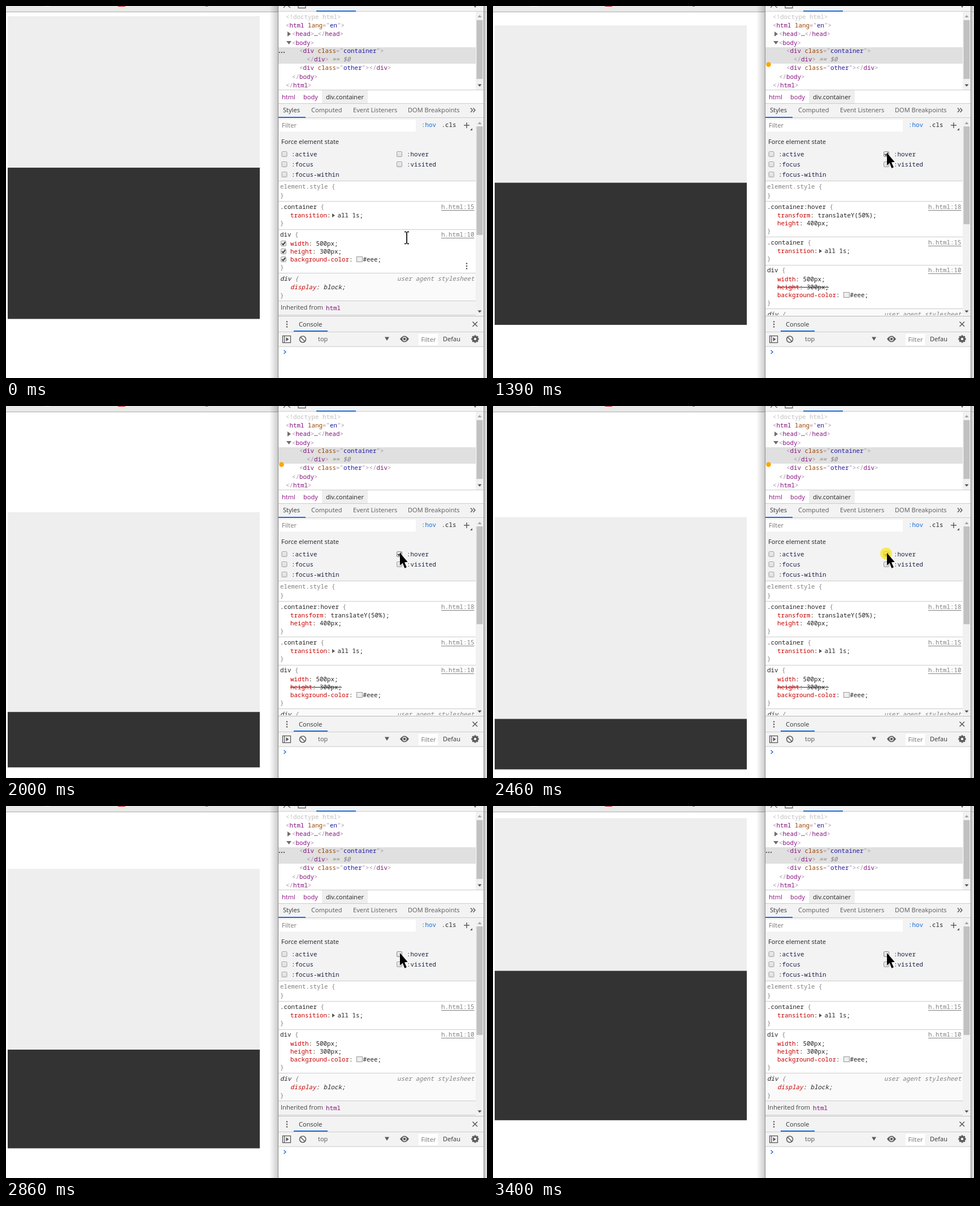
These frames come from a looping animation (851x658 px, 3480 ms). An HTML page with a canvas:

```html
<!DOCTYPE html>
<html lang="en">
<head>
<meta charset="utf-8">
<title>Forced hover state</title>
<style>
html, body { margin: 0; width: 100%; height: 100%; overflow: hidden; background: #fff; }
canvas { display: block; }
</style>
</head>
<body>
<canvas id="stage" width="851" height="658"></canvas>
<script>
const ctx = document.getElementById('stage').getContext('2d');
const LOOP = 3480;
const MONO = '10.83px "Noto Sans Mono", monospace';
const SANS = '11.1px "Open Sans", sans-serif';
const INK = '#222', RED = '#c80000', GREY = '#808080', PALE = '#a894a6';
const TAG = '#881280', ATTR = '#994500', VALUE = '#1a1aa6', BLUE = '#1a6edb', BAR = '#f3f3f3';

// The screen only refreshes at these moments.
const ticks = [0, 70, 140, 220, 290, 370, 440, 520, 590, 660, 750, 820, 900, 980,
  1140, 1220, 1300, 1390, 1460, 1540, 1620, 1670, 1770, 1850, 1930, 2000, 2080, 2150, 2220,
  2460, 2630, 2700, 2780, 2860, 2930, 3000, 3080, 3150, 3250, 3320, 3400];

const clamp = v => Math.max(0, Math.min(1, v));
const mix = (a, b, k) => a + (b - a) * k;
const smooth = k => k * k * (3 - 2 * k);

// CSS "ease": cubic-bezier(.25, .1, .25, 1)
function ease(x) {
  x = clamp(x);
  if (x === 0 || x === 1) return x;
  let lo = 0, hi = 1, u;
  for (let i = 0; i < 24; i++) {
    u = (lo + hi) / 2;
    const bx = .75 * u * (1 - u) + u ** 3;
    if (bx < x) lo = u; else hi = u;
  }
  return .3 * u * (1 - u) ** 2 + 3 * u * u * (1 - u) + u ** 3;
}

function hoverAmount(t) {
  if (t < 1300) return 0;
  if (t < 2630) return ease((t - (t < 1650 ? 1276 : 1250)) / 1000);
  return 1 - ease((t - 2606) / 1000);
}

function pointer(t) {
  if (t < 590) {
    const k = smooth(t / 590);
    return [mix(709, 703, k), mix(410, 277, k)];
  }
  if (t < 660) return [703, 277];
  const k = smooth(clamp((t - 660) / 320));
  return [mix(702, 697, k), mix(275, 260, k)];
}

function rect(x, y, w, h, color) {
  ctx.fillStyle = color;
  ctx.fillRect(x, y, w, h);
}

function poly(color, ...p) {
  ctx.fillStyle = color;
  ctx.beginPath();
  for (let i = 0; i < p.length; i += 2) ctx.lineTo(p[i], p[i + 1]);
  ctx.fill();
}

function stroke(color, width, ...p) {
  ctx.strokeStyle = color;
  ctx.lineWidth = width;
  ctx.beginPath();
  for (let i = 0; i < p.length; i += 2) ctx.lineTo(p[i], p[i + 1]);
  ctx.stroke();
}

function disc(x, y, r, color) {
  ctx.fillStyle = color;
  ctx.beginPath();
  ctx.arc(x, y, r, 0, 7);
  ctx.fill();
}

function ring(x, y, r, color, width) {
  ctx.strokeStyle = color;
  ctx.lineWidth = width;
  ctx.beginPath();
  ctx.arc(x, y, r, 0, 7);
  ctx.stroke();
}

function dots(x, y, dx, dy, r, color) {
  for (let i = -1; i < 2; i++) disc(x + i * dx, y + i * dy, r, color);
}

function label(s, x, y, color = '#333') {
  ctx.font = SANS;
  ctx.fillStyle = color;
  ctx.fillText(s, x, y);
}

// Colour and text alternate; y is the baseline.
function write(font, x, y, runs) {
  ctx.font = font;
  for (let i = 0; i < runs.length; i += 2) {
    ctx.fillStyle = runs[i];
    ctx.fillText(runs[i + 1], x, y);
    x += ctx.measureText(runs[i + 1]).width;
  }
}
const code = (x, y, ...runs) => write(MONO, x, y, runs);
const slanted = (x, y, ...runs) => write('italic ' + MONO, x, y, runs);

function checkbox(x, y, checked, over) {
  const g = ctx.createLinearGradient(0, y, 0, y + 10);
  g.addColorStop(0, '#ededed');
  g.addColorStop(1, '#dcdcdc');
  ctx.fillStyle = g;
  ctx.strokeStyle = over ? '#888' : '#a0a0a0';
  ctx.lineWidth = 1;
  ctx.beginPath();
  ctx.roundRect(x + .5, y + .5, 9, 9, 1.5);
  ctx.fill();
  ctx.stroke();
  if (checked) stroke('#333', 1.8, x + 2.2, y + 5, x + 4.3, y + 7.3, x + 8, y + 2.4);
}

function scrollbar(top, bottom, thumbTop, thumbBottom) {
  rect(831, top, 14, bottom - top, '#f1f1f1');
  rect(832.5, thumbTop, 11, thumbBottom - thumbTop, '#c1c1c1');
}

function drawPage(p) {
  const z = .8925, h = (300 + 100 * p) * z;
  rect(0, 0, 851, 658, '#fff');
  rect(0, 0, 481, 10, '#e9e9e9');
  rect(0, 10, 481, 1, '#adadad');
  rect(66, 0, 13, 1, '#fff');
  rect(198, 0, 13, 1, '#d4141c');
  rect(353, 0, 4, 1, '#777');
  rect(3, 18 + h, 446, 300 * z, '#333');
  rect(3, 18 + h * p / 2, 446, h, '#eee');
  const g = ctx.createLinearGradient(466, 0, 481, 0);
  g.addColorStop(0, 'rgba(0,0,0,0)');
  g.addColorStop(1, 'rgba(0,0,0,.2)');
  rect(466, 0, 15, 658, g);
}

function drawTree(hover) {
  rect(482, 0, 364, 658, '#fff');
  rect(482, 0, 364, 10, BAR);
  rect(482, 9, 364, 1, '#ccc');
  rect(549, 8, 70, 2, BLUE);
  stroke('#666', 1.3, 491, 3, 494, 0);
  stroke('#666', 1.3, 499, 0, 503, 3);
  stroke('#666', 1.3, 517, 0, 517, 3.5, 530, 3.5, 530, 0);
  disc(830, 1, 1.5, '#666');

  rect(482, 73, 349, 29, '#e0e0e0');
  code(495, 23, '#c0c0c0', '<!doctype html>');
  code(495, 38, PALE, '<', TAG, 'html ', ATTR, 'lang', PALE, '="', VALUE, 'en', PALE, '">');
  poly('#6e6e6e', 498, 45, 504, 49.5, 498, 54);
  code(506, 53, PALE, '<', TAG, 'head', PALE, '>', INK, '…', PALE, '</', TAG, 'head', PALE, '>');
  poly('#6e6e6e', 496, 62, 505, 62, 500.5, 68);
  code(506, 69, PALE, '<', TAG, 'body', PALE, '>');
  code(519, 83, PALE, '<', TAG, 'div ', ATTR, 'class', PALE, '="', VALUE, 'container', PALE, '">');
  code(532, 98, PALE, '</', TAG, 'div', PALE, '>');
  slanted(577, 98, GREY, '== $0');
  code(519, 113, PALE, '<', TAG, 'div ', ATTR, 'class', PALE, '="', VALUE, 'other',
    PALE, '"></', TAG, 'div', PALE, '>');
  code(506, 129, PALE, '</', TAG, 'body', PALE, '>');
  code(495, 144, PALE, '</', TAG, 'html', PALE, '>');
  if (hover) disc(487.5, 103.5, 4.3, '#ffa500');
  else dots(488, 82, 4, 0, 1.2, '#666');
  scrollbar(10, 148, 25, 129);
  poly('#a0a0a0', 834.5, 20, 838, 16, 841.5, 20);
  poly('#505050', 834.5, 138.5, 838, 142.5, 841.5, 138.5);

  rect(482, 148, 364, 1, '#ccc');
  rect(559, 149, 81, 23, '#eee');
  label('html', 488, 165, TAG);
  label('body', 526, 165, TAG);
  label('div.container', 566, 165, INK);
}

function drawFilters(checked, over) {
  rect(482, 172, 364, 137, BAR);
  rect(482, 172, 364, 1, '#ccc');
  rect(482, 197, 364, 1, '#ccc');
  rect(482, 196, 48, 2, BLUE);
  label('Styles', 490, 188);
  label('Computed', 540, 188, '#5a5a5a');
  label('Event Listeners', 614, 188, '#5a5a5a');
  label('DOM Breakpoints', 711, 188, '#5a5a5a');
  for (const x of [822, 826.5]) stroke('#555', 1.4, x, 180.5, x + 3.5, 184.2, x, 188);

  rect(484, 201, 241, 21, '#fff');
  label('Filter', 488, 215, '#757575');
  code(735, 214, BLUE, ':hov');
  code(770.5, 214, INK, '.cls');
  rect(810, 210.3, 10, 1.4, '#555');
  rect(814.3, 206, 1.4, 10, '#555');
  poly('#555', 825, 216, 825, 220, 821, 220);

  label('Force element state', 487, 244, INK);
  ['active', 'focus', 'focus-within'].forEach((s, i) => {
    checkbox(487.5, 257 + i * 18, false);
    code(505, 266 + i * 18, '#1c2344', ':' + s);
  });
  checkbox(691, 257, checked, over);
  checkbox(691, 275, false);
  code(709, 266, '#1c2344', ':hover');
  code(709, 284, '#1c2344', ':visited');
}

function selector(name, y, source) {
  code(485, y, INK, name, GREY, ' {');
  code(770, y, GREY, source);
  rect(770, y + 2, 58.5, 1, GREY);
}

function property(name, value, y) {
  code(503, y, RED, name, INK, ': ' + value + ';');
}

const divider = y => rect(482, y, 349, 1, '#ccc');
const brace = y => code(485, y, GREY, '}');

function drawRules(hover, editing) {
  ctx.save();
  ctx.beginPath();
  ctx.rect(482, 309, 363, 238);
  ctx.clip();
  rect(482, 309, 364, 240, '#fff');
  divider(309);
  code(485, 323, GREY, 'element.style {');
  brace(339);
  divider(345);
  if (hover) {
    selector('.container:hover', 359, 'h.html:18');
    property('transform', 'translateY(50%)', 374);
    property('height', '400px', 388);
    brace(402);
    ctx.translate(0, 63);
    divider(345);
  }
  selector('.container', 359, 'h.html:15');
  code(503, 374, RED, 'transition', INK, ':');
  poly('#555', 577, 367, 582, 370.5, 577, 374);
  code(586.5, 374, INK, 'all 1s;');
  brace(388);
  divider(395);

  selector('div', 408, 'h.html:10');
  property('width', '500px', 424);
  property('height', '300px', 438);
  if (hover) rect(503, 434, 91, 1, INK);
  code(503, 452, RED, 'background-color', INK, ':');
  rect(620, 443, 11, 10, '#999');
  rect(621, 444, 9, 8, '#eee');
  code(631.5, 452, INK, '#eee;');
  brace(466);
  if (editing) {
    for (let i = 0; i < 3; i++) checkbox(486, 415 + i * 14, true);
    dots(815, 460, 0, 4.5, 1.3, '#555');
  }

  rect(482, 472, 349, 50, '#fafafa');
  divider(472);
  slanted(485, 486, INK, 'div', GREY, ' {');
  slanted(692, 486, GREY, 'user agent stylesheet');
  slanted(503, 501, RED, 'display', INK, ': block;');
  brace(516);
  rect(482, 521, 349, 25, BAR);
  divider(521);
  label('Inherited from', 486, 537, '#444');
  code(566, 538, TAG, 'html');
  divider(546);
  ctx.restore();

  scrollbar(199, 547, 213, hover ? 386 : 405);
  poly('#a0a0a0', 834.5, 209, 838, 205, 841.5, 209);
  poly('#505050', 834.5, 538.5, 838, 542.5, 841.5, 538.5);
}

function drawConsole() {
  rect(482, 548, 364, 54, BAR);
  rect(482, 548, 364, 1, '#b8b8b8');
  rect(482, 576, 364, 1, '#ccc');
  rect(482, 602, 364, 1, '#ccc');
  rect(509, 574, 60, 2, BLUE);
  dots(497, 563, 0, 4.5, 1.3, '#5a5a5a');
  label('Console', 518, 567);
  stroke('#555', 1.4, 825.5, 558.5, 834, 567);
  stroke('#555', 1.4, 834, 558.5, 825.5, 567);

  ctx.strokeStyle = '#5a5a5a';
  ctx.lineWidth = 1.3;
  ctx.strokeRect(489.5, 583.5, 14, 12);
  rect(492, 584, 1.2, 11, '#5a5a5a');
  poly('#5a5a5a', 495.5, 586, 500.5, 589.5, 495.5, 593);
  ring(525, 589.5, 5.5, '#5a5a5a', 1.5);
  stroke('#5a5a5a', 1.5, 521, 585.5, 529, 593.5);
  label('top', 552, 593, '#555');
  poly('#5a5a5a', 670, 585.5, 678, 585.5, 674, 592);

  ctx.fillStyle = '#5a5a5a';
  ctx.beginPath();
  ctx.moveTo(697, 589);
  ctx.quadraticCurveTo(705, 578, 713, 589);
  ctx.quadraticCurveTo(705, 600, 697, 589);
  ctx.fill();
  ring(705, 589, 3, BAR, 1.3);

  rect(730, 580, 34, 20, '#fff');
  label('Filter', 734.5, 594, '#757575');
  label('Defau', 773, 593);
  for (let i = 0; i < 4; i++) {
    const a = i * Math.PI / 4, dx = Math.cos(a) * 6.7, dy = Math.sin(a) * 6.7;
    stroke('#5a5a5a', 3, 830 - dx, 589 - dy, 830 + dx, 589 + dy);
  }
  disc(830, 589, 5.3, '#5a5a5a');
  disc(830, 589, 2.2, BAR);
  stroke('#367cf1', 1.6, 491.5, 608.8, 495, 612, 491.5, 615.2);
}

function drawFrame() {
  rect(481, 0, 1, 658, '#8a8a8a');
  rect(845, 0, 1.5, 658, '#8a8a8a');
  const g = ctx.createLinearGradient(846, 0, 851, 0);
  g.addColorStop(0, '#c8c8c8');
  g.addColorStop(1, '#e2e2e2');
  rect(846.5, 0, 4.5, 658, g);
  rect(846.5, 10, 4.5, 1, '#adadad');
}

function drawPointer(x, y) {
  if (y > 312) {
    rect(x - .8, y - 10, 1.7, 20, '#000');
    for (const s of [-1, 1]) {
      rect(x - 4, y + s * 10.5 - .8, 3.3, 1.6, '#000');
      rect(x + .7, y + s * 10.5 - .8, 3.3, 1.6, '#000');
    }
    return;
  }
  ctx.save();
  ctx.translate(x, y);
  poly('#000', 0, 0, 0, 22, 4.6, 17.6, 8.4, 27, 11.8, 25.3, 8, 16.4, 13.6, 15.8);
  ctx.restore();
}

function draw(now) {
  const ms = now % LOOP;
  const t = ticks.findLast(v => v <= ms);
  const hover = t >= 1300 && t < 2630;
  const checked = t >= 1220 && t < 2630;
  const pressed = t === 1140 || t === 2460;
  const [x, y] = pointer(t);
  drawPage(hoverAmount(t));
  drawTree(hover);
  drawFilters(checked, t >= 980);
  drawRules(hover, y > 395);
  drawConsole();
  drawFrame();
  if (pressed) disc(695.5, 261, 10.5, 'rgba(246,228,20,.72)');
  drawPointer(x, y);
}

const start = performance.now();
function loop() {
  draw(performance.now() - start);
  requestAnimationFrame(loop);
}
loop();
</script>
</body>
</html>
```
